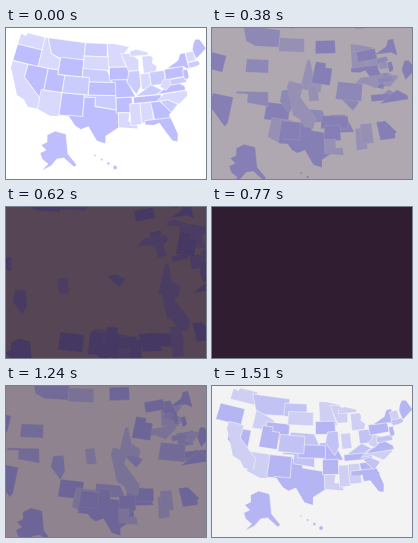
Animation of 200 by 151 pixels, one loop 1540 ms. Source, as an HTML page with a canvas:

```html
<!DOCTYPE html>
<html lang="en">
<head>
<meta charset="utf-8">
<title>Scattering map</title>
<style>
html, body { margin: 0; width: 100%; height: 100%; overflow: hidden; background: #fff; }
canvas { display: block; width: 100vw; height: 100vh; }
</style>
</head>
<body>
<canvas id="map"></canvas>
<script>
const W = 200, H = 151, LOOP = 1540, STEP = 30, LAST = 18;
const canvas = document.getElementById('map');
const ctx = canvas.getContext('2d');

const PAPER = [255, 255, 255], NIGHT = [51, 32, 51], SHADE = [45, 29, 68];
const DARK = [190, 190, 254], MID = [203, 204, 254], PALE = [216, 217, 253];
const pieces = [];

let seed = 11;
const rnd = () => (seed = seed * 16807 % 2147483647) / 2147483647;
const drift = size => (rnd() - 0.5) * size;

// Albers equal-area cone; longitude is given in degrees west
function project([lon, lat]) {
  const rad = Math.PI / 180, n = 0.6029;
  const r = Math.sqrt(1.3513 - 2 * n * Math.sin(lat * rad)) / n;
  const a = n * (96 - lon) * rad;
  return [104.5 + 270 * r * Math.sin(a), 247 * r * Math.cos(a) - 256.4];
}

function points(text) {
  return text.split(',').map(p => p.trim().split(' ').map(Number));
}

function polygon(list) {
  const path = new Path2D();
  list.forEach(p => path.lineTo(...p));
  path.closePath();
  return path;
}

// The coast and borders trim every mainland state
const coast = polygon(points(`124.7 48.4, 123 48.2, 122.8 49, 95.2 49, 89.6 48, 91 46.8, 88 47.4,
  84.5 46.5, 83.3 45, 83.7 43.9, 82.4 43, 83.2 41.8, 79 42.8, 79 43.3, 76.5 43.5, 75 45, 71.5 45,
  70 46.7, 69.2 47.4, 68 47.2, 67 44.8, 70.7 43.1, 70 41.7, 74 40.7, 74 39.6, 75.5 38, 75.7 35.3,
  78 33.9, 81.3 31.7, 80 27, 80.4 25.2, 81.5 25.6, 82.7 27.8, 84 30.1, 85.3 29.7, 89.5 30.2,
  89.4 29.2, 94 29.7, 97.2 27.7, 97.2 25.9, 99.2 26.5, 101.4 29.8, 103.2 29, 104.6 29.7,
  106.5 31.8, 111 31.3, 114.8 32.5, 117.1 32.5, 118.5 34, 120.6 34.6, 122 36.9, 124.4 40.4`).map(project));

// Two points make a box, more make an outline; vx, vy are pixels per step
function state(tone, text, vx = drift(7), vy = drift(5)) {
  let list = points(text);
  if (list.length === 2) {
    const [[w, n], [e, s]] = list;
    list = [[w, n], [e, n], [e, s], [w, s]];
  }
  pieces.push({ tone, vx, vy, path: polygon(list.map(project)), clip: coast });
}

// West
state(PALE, '125 49, 117 45.9', 6.5, -3);
state(DARK, '125 45.9, 117 42', -3.1, 0.8);
state(PALE, '117 49, 116 49, 114 45.5, 111 44.5, 111 42, 117 42', 8, 3.2);
state(MID, '116 49, 104 49, 104 45, 111 44.7, 114 45.5', -1.6, -1.8);
state(DARK, '120 42, 114 42, 114 36, 114.6 35, 120 39', -3, 4.1);
state(DARK, '111 45, 104 41', 0, 6.4);
state(PALE, '114.7 37, 109 31', 3.5, 4);
state(DARK, '109 37, 103 31.8', 1.9, 4);

// Plains
state(MID, '104 49, 97 45.9', -6.4, 2.3);
state(PALE, '104 45.9, 96.5 42.8', -1.5, -2.6);
state(MID, '104 43, 97 42.8, 95.5 40, 102 40, 102 41, 104 41', 1.3, 5.7);
state(DARK, '103 36.5, 100 36.5, 100 34.4, 94 33.6, 93.8 29, 97 25, 107 29, 107 32, 103 32', 1.5, 3.4);
state(MID, '103 37, 94.5 37, 94.5 33.7, 100 34.5, 100 36.5, 103 36.5', -7.7, -0.5);
state(PALE, '97 49, 89 49, 92.5 46, 91.3 43.5, 96.5 43.5', 5.3, 0.1);
state(DARK, '96.3 43.5, 90.6 40.5', 0, -3.8);
state(DARK, '95.7 40.6, 91.5 40.6, 89.3 36.5, 94.6 36.5', 1.8, 5);
state(DARK, '102 40, 94.6 37', 3.8, 4.8);
state(DARK, '94.5 36.5, 90.3 33', 0.3, 4);
state(PALE, '94 33, 91.1 33, 91.5 31, 89.6 31, 89 29, 94 29', 0, 3.8);

// Lakes
state(PALE, '92.8 46.7, 90 46.6, 87.5 45, 87.8 42.5, 90.8 42.5', 3, -6);
state(MID, '90.6 42.5, 87.6 42.5, 87.6 39, 89 37, 91.4 40', -7.6, 2.7);
state(PALE, '86.5 45.7, 82.4 41.8', 2.5, -0.6);
state(PALE, '90 47.5, 84.5 45.9', 2.5, -0.6);
state(PALE, '87.5 41.7, 84.8 38.1', -5.5, 1.7);
state(MID, '84.8 41.9, 80.6 38.8', 2.7, 0.3);

// South
state(MID, '84.8 39, 82 37.5, 83.7 36.6, 89.3 36.6', 4.5, 0.7);
state(DARK, '89.9 36.5, 82.5 35', 4.5, -0.3);
state(PALE, '91 35, 88.3 30', 2.8, 3.5);
state(PALE, '88.3 35, 85.3 30.4', 2, 3);
state(DARK, '85.5 35, 83.1 35, 80.5 32, 81.5 30.7, 85 30.7', 2.8, 2.8);
state(DARK, '87.5 30.9, 79.5 25', 0, -7.5);
state(MID, '83 35, 81 35.2, 78.6 33.8, 80.5 32');
state(PALE, '84 35, 81.7 36.6, 75 36.5, 75 35, 78 33.5, 81 35.1');
state(DARK, '83.5 36.6, 78.3 39.2, 75.8 37.5, 75.8 36.6', 2.4, 1.3);
state(PALE, '82.5 38.3, 80.5 40.4, 78 39.4, 81 37.3');

// Northeast
state(DARK, '80.5 42.1, 75 39.7', -2, -2.5);
state(DARK, '79.8 42.2, 76 43.6, 75 45, 73.4 45, 73.4 41, 75 42', 0.3, -2);
state(MID, '79.4 39.6, 75 38.3');
state(DARK, '75.4 41.2, 74 39');
state(PALE, '73.3 45, 70.9 42.7');
state(MID, '73.4 42.6, 70 41.3');
state(DARK, '71 45.3, 69.5 48, 67 48, 66.5 44.5, 70.7 43', 0.5, 3);

// Long crossings pass over the rest
state(DARK, '114 42, 111 42, 111 41, 109 41, 109 37, 114 37', 8.8, -1);
state(MID, '109 41, 102 37', 9.6, 0.9);
state(PALE, '125 42, 120 42, 120 39, 114.6 35, 114.6 32, 125 32', 10, 2.9);

// Insets, in stage pixels
pieces.push({
  tone: DARK, vx: -2.4, vy: 1.9,
  path: polygon(points(`41 107, 49 103, 60 106, 62 126, 71 137, 68 139, 58 130, 51 131,
    45 138, 35 143, 42 136, 36 131, 34 125, 40 122, 35 117, 41 114`))
});
const islands = new Path2D();
for (let i = 0; i < 4; i++) {
  const r = 1.1 + i * i * 0.12, x = 89 + i * 6.7;
  islands.moveTo(x + r, 127.5 + i * 4);
  islands.arc(x, 127.5 + i * 4, r, 0, 7);
}
pieces.push({ tone: DARK, vx: 0, vy: 2.5, path: islands });

const blend = (a, b, t) => 'rgb(' + a.map((c, i) => Math.round(c + (b[i] - c) * t)).join() + ')';

function stepAt(t) {
  if (t < 200) return 0;
  if (t < 770) return Math.min(LAST, Math.floor((t - 200) / STEP) + 1);
  if (t < 1000) return LAST + 1;
  return LAST - Math.floor((t - 1000) / STEP);
}

function draw(k) {
  const sx = canvas.width / W, sy = canvas.height / H;
  const dark = Math.min(1, k / LAST);
  const back = k > LAST ? 'rgb(49,29,50)' : blend(PAPER, NIGHT, dark);
  ctx.setTransform(sx, 0, 0, sy, 0, 0);
  ctx.fillStyle = back;
  ctx.fillRect(0, 0, W, H);
  if (k > LAST) return;
  for (const p of pieces) {
    ctx.save();
    ctx.translate(p.vx * k, p.vy * k);
    if (p.clip) ctx.clip(p.clip);
    ctx.fillStyle = blend(p.tone, SHADE, dark);
    ctx.fill(p.path);
    ctx.strokeStyle = back;
    ctx.lineWidth = 0.7;
    ctx.globalAlpha = k < 2 ? 0.9 : 0.4;
    ctx.stroke(p.path);
    ctx.restore();
  }
}

function resize() {
  const dpr = window.devicePixelRatio || 1;
  canvas.width = Math.round(innerWidth * dpr);
  canvas.height = Math.round(innerHeight * dpr);
}

const start = performance.now();
function tick() {
  draw(stepAt((performance.now() - start) % LOOP));
  requestAnimationFrame(tick);
}
addEventListener('resize', resize);
resize();
tick();
</script>
</body>
</html>
```
